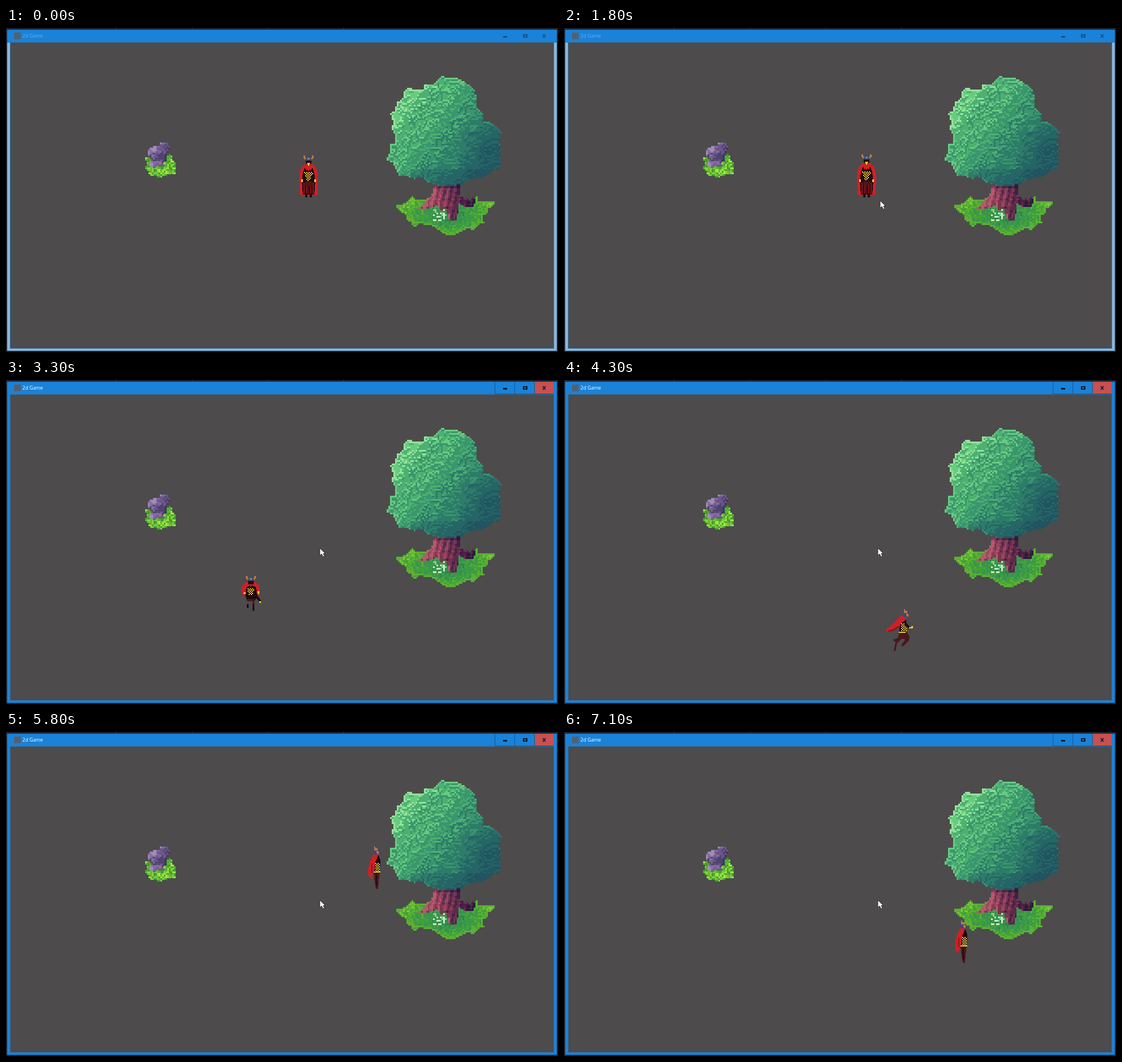
Recreate the animation shown at these times as an HTML page. Size 976 by 574 pixels, loop 7.2 s.

```html
<!DOCTYPE html>
<html lang="en">
<head>
<meta charset="utf-8">
<title>2d Game</title>
<style>
html, body { margin: 0; width: 100%; height: 100%; overflow: hidden; background: #1c2531; }
svg { display: block; width: 976px; height: 574px; }
text { font: 8.6px "Open Sans", "Noto Sans", sans-serif; }
</style>
</head>
<body>
<svg id="stage" viewBox="0 0 976 574" shape-rendering="crispEdges"></svg>
<script>
const LOOP = 7200, STEP = 100, ACTIVE_AT = 2300, CELL = 3;
const stage = document.getElementById('stage');

function add(parent, tag, attrs) {
  const el = document.createElementNS('http://www.w3.org/2000/svg', tag);
  for (const k in attrs) el.setAttribute(k, attrs[k]);
  return parent.appendChild(el);
}
const group = () => add(stage, 'g', {});
const rect = (x, y, width, height, fill, parent = stage) => add(parent, 'rect', { x, y, width, height, fill });
const path = (parent, fill, d) => add(parent, 'path', { fill, d });
const clamp = (v, a, b) => Math.max(a, Math.min(b, v));

let seed = 11;
function rnd() {
  seed = (seed * 1664525 + 1013904223) >>> 0;
  return seed / 4294967296;
}

/* Window */
rect(0, 0, 976, 574, '#1c2531');
for (const x of [194, 329, 462, 596]) rect(x, 0, 1, 2, '#4b5663');
const frame = rect(2, 3, 972, 569, '#8bb4da');
rect(2, 3, 972, 23, '#1a82d9');
rect(7, 25, 962, 543, '#326b98');
rect(8, 26, 960, 541, '#4d4b4c');
rect(14, 8, 12, 12, '#53616e');
const title = add(stage, 'text', { x: 29, y: 17 });
title.textContent = '2d Game';
const buttons = group();
rect(934, 3, 34, 22, '#c75050', buttons);
for (const x of [864, 899, 934]) rect(x, 3, 1, 22, '#17558c', buttons);
rect(864, 24, 104, 1, '#17558c', buttons);
const glyphs = group();
path(glyphs, 'inherit', 'M879 14h7v3h-7zM914 11h8v6h-8zM916 13v2h4v-2z').setAttribute('fill-rule', 'evenodd');
add(glyphs, 'path', { d: 'M949 11l5 6M954 11l-5 6', 'stroke-width': 1.5, 'shape-rendering': 'auto' });

/* Pixel scenery */
const parse = s => s.split(' ').map(p => p.split(',').map(Number));

function inside(pts, x, y) {
  let hit = false;
  for (let i = 0, j = pts.length - 1; i < pts.length; j = i++) {
    const [ax, ay] = pts[i], [bx, by] = pts[j];
    if ((ay > y) !== (by > y) && x < (bx - ax) * (y - ay) / (by - ay) + ax) hit = !hit;
  }
  return hit;
}

function raster(outline, colour) {
  const pts = parse(outline), xs = pts.map(p => p[0]), ys = pts.map(p => p[1]);
  const x0 = Math.min(...xs), y0 = Math.min(...ys), layers = {};
  const isIn = (x, y) => inside(pts, x + 1.5, y + 1.5);
  for (let y = y0; y < Math.max(...ys); y += CELL)
    for (let x = x0; x < Math.max(...xs); x += CELL) {
      if (!isIn(x, y)) continue;
      const edge = !isIn(x - 3, y) || !isIn(x, y - 3) ? -1 : !isIn(x + 3, y) || !isIn(x, y + 3) ? 1 : 0;
      const c = colour(x, y, edge);
      layers[c] = (layers[c] || '') + `M${x} ${y}h3v3h-3z`;
    }
  for (const c in layers) path(stage, c, layers[c]);
}
const pick = (pal, v) => pal[clamp(Math.round(v), 0, pal.length - 1)];

const grass = ['#78c83a', '#5cb032', '#43a13c', '#35954f', '#2d8551'];
raster('687,312 696,314 708,308 720,298 726,304 740,304 760,298 810,302 826,308 830,299 836,300 834,308 849,306 866,309 860,317 850,319 853,327 842,334 846,348 838,345 828,357 815,356 802,362 786,369 770,362 757,352 745,348 730,347 722,354 716,344 706,340 710,333 696,324',
  (x, y, edge) => {
    const r = Math.hypot((x - 778) / 88, (y - 330) / 40);
    return pick(grass, edge ? 1 : 3.9 - r * 3.2 + (rnd() - .5) * 2);
  });

const bark = ['#b65a6b', '#984660', '#793650', '#5e294b', '#432044', '#2d1a38'];
raster('757,272 804,272 803,294 811,302 821,304 826,299 831,305 826,316 812,317 801,312 799,326 797,341 784,341 781,330 777,318 770,324 764,315 752,316 742,322 728,319 738,312 748,303 754,292',
  (x, y, edge) => pick(bark, (x - 740) / 18 + Math.sin(x * .55 + y * .12) * .9 + (y < 283 ? 1.3 : 0) + edge * .8 + (rnd() - .5)));

for (let i = 0; i < 22; i++)
  rect(755 + CELL * Math.floor(rnd() * 8), 321 + CELL * Math.floor(rnd() * 7), 3, 3, i % 3 ? '#cbefc4' : '#8bcf8d');

const leaf = ['#c4f7bb', '#94e49b', '#68cb80', '#4db072', '#3a966c', '#2d7b69', '#256566', '#205561'];
const baseShade = (x, y) => {
  const u = (x - 673) / 203, v = (y - 85) / 193;
  const lobe = Math.max(0, 1 - Math.hypot((u - .86) / .3, (v - .66) / .35));
  return 7 * (.17 + .46 * u + .33 * v) + lobe * 1.1 + (v > .85 && u > .2 ? .9 : 0);
};
const leafShade = {};
const key = (x, y) => Math.round((x - 673) / CELL) + ',' + Math.round((y - 85) / CELL);
for (let n = 0; n < 680; n++) {
  const x = 673 + rnd() * 203, y = 85 + rnd() * 193, len = 2 + rnd() * 4;
  const a = -.75 + (rnd() - .5) * 1.9 + (x - 770) / 170;
  const power = clamp(1.9 - baseShade(x, y) * .25, .45, 1.6);
  for (let k = 0; k < len; k++) {
    const px = x + Math.cos(a) * k * CELL, py = y + Math.sin(a) * k * CELL;
    leafShade[key(px, py + CELL)] = power * .65;
    leafShade[key(px, py)] = -power * (k < 1 ? .7 : 1.05);
  }
}
raster('673,233 678,222 678,207 688,205 689,192 683,181 684,163 679,152 689,145 690,133 703,124 702,113 712,106 725,110 738,108 740,100 755,100 765,90 770,85 780,88 798,88 812,97 826,106 833,124 832,140 843,150 845,165 858,168 868,176 876,186 872,203 876,214 874,237 873,248 862,252 852,260 838,266 822,267 808,276 795,279 765,279 745,273 735,264 722,267 706,262 696,262 690,250 685,240',
  (x, y, edge) => pick(leaf, baseShade(x, y) + (edge < 0 ? -1 : (leafShade[key(x, y)] || 0) + edge * .2)));

const lime = ['#a5e83f', '#82d338', '#63b832', '#469d32'];
raster('246,230 254,230 260,238 280,237 282,226 292,223 294,235 302,238 299,247 299,259 287,259 272,266 264,262 254,260 252,253 246,248 249,240',
  () => pick(lime, rnd() * 3.4));
const stone = ['#a08bb8', '#846e9f', '#6c5789', '#514371', '#3c345b'];
raster('251,218 255,211 264,210 272,207 274,203 287,203 290,217 284,222 285,235 278,238 280,245 271,244 264,249 254,245 255,236 261,232 252,226',
  (x, y, edge) => pick(stone, (x - 252) / 18 + (y > 220 && y < 236 ? 1 : 0) + edge * .7 + rnd() * 1.6 - .2));

/* Hero: shapes are relative to the point between the feet */
const RED = '#cf2026', DEEP = '#8d151c', DARK = '#210b10', MAROON = '#4b171b',
  GOLD = '#eccb35', HORN = '#c27a43', HELM = '#3b4a70', SKIN = '#c07845';
const hero = group();

function checks(x0, y0, cols, rows, taper) {
  let d = '';
  for (let r = 0; r < rows; r++)
    for (let c = 0; c < cols; c++) {
      const off = Math.abs(c - (cols - 1) / 2);
      if ((r + c) % 2 === 0 && off <= cols / 2 - r * taper) d += `M${x0 + c * 2} ${y0 + r * 2}h2v2h-2z`;
    }
  return d;
}
const frontHead = y => [
  [HORN, `M-9 ${y}h3v4h3v3h-4v-2h-2zM9 ${y}h-3v4h-3v3h4v-2h2z`],
  [HELM, `M-5 ${y + 5}l3-2h4l3 2v9h-10z`],
  ['#6c88b2', `M-2 ${y + 4}h4v3h-4z`],
  [DARK, `M-5 ${y + 9}h10v6h-10z`]
];
const sideHead = (x, y) => [
  [HELM, `M${x} ${y + 4}h8v3h2v7h-9z`],
  [HORN, `M${x + 2} ${y}h2v3h4v4h-3v-2h-3z`],
  ['#6c88b2', `M${x + 2} ${y + 5}h3v2h-3z`],
  [SKIN, `M${x + 6} ${y + 8}h4v5h-3z`]
];

function idleFront(up) {
  const w = 16 + up / 2, y = -73 - up, s = -59 - up;
  return [
    [RED, `M-5 ${s}h10l8 7L${w} -42 16-4 10-2H-10L-16-4-${w}-42-13 ${s + 7}z`],
    [DARK, `M-7 ${s + 8}L0 ${s + 12} 7 ${s + 8} 10-43 12-28 10-4H-10L-12-28-10-43z`],
    [DEEP, 'M-9-25h2v20h-2zM7-25h2v20h-2zM-4-24h2v18h-2zM3-24h2v18h-2z'],
    [MAROON, 'M-6-27h12v8h-12zM-1-22h2v17h-2z'],
    [GOLD, checks(-8, -44 - up / 2, 8, 8, .38) + 'M-13-31h3v5h-3zM10-31h3v5h-3z'],
    [DARK, 'M-6-6h4v7h-4zM2-6h4v7h-4z'],
    ...frontHead(y),
    [GOLD, `M-3 ${y + 13}h6l-3 6z`],
    [RED, `M-1 ${y + 21}h2v6h-2zM-5 ${y + 22}h2v4h-2zM3 ${y + 22}h2v4h-2z`]
  ];
}

function runFront(step) {
  const a = step % 2 ? -5 : 0, b = -5 - a;
  return [
    [RED, 'M-8-51H8L15-44 16-34 12-23H-6L-16-30-17-43z'],
    [DARK, 'M-8-42L0-46 9-42 11-27 7-18H-7L-10-28zM10-30l8 12-2 3-8-9z'],
    [GOLD, checks(-6, -40, 6, 6, .2) + 'M-13-33h4v3h-4zM15-17h3v3h-3zM12-35h3v5h-3z'],
    [MAROON, `M-7-21H6v${9 + b}h-3v-5h-7v${5 + a}h-3z`],
    [DARK, `M-7-12h3v${12 + a}h-3zM3-12h3v${12 + b}h-3z`],
    ...frontHead(-62),
    [RED, 'M-1-47h2v4h-2z']
  ];
}

const runBack = step => [
  [DARK, step % 2 ? 'M-6-14h4v14h-4zM2-14h4v9h-4z' : 'M-6-14h4v9h-4zM2-14h4v14h-4z'],
  [RED, 'M-6-60H6L14-52 16-30 13-9 5-6-4-10-14-7-16-30-14-52z'],
  [DEEP, 'M-7-46h2v34h-2zM0-48h2v36h-2zM7-44h2v34h-2z'],
  ...frontHead(-73)
];

const legs = [
  'M-6-33H8L12-25 11-19 1-8-3-10 4-20-2-22-10-14-13 0H-16L-13-15-18-20-9-23z',
  'M-5-33H7L6-23 12-13 10-1 6 0 7-12-1-22-6-15-16-11-18-15-9-20z',
  'M-5-33H7L8-20 3-10 5 0H-1L-2-11 2-20-4-20-11-9-15-12-8-22z'
];
const runSide = step => [
  [DARK, 'M-5-58H5L7-47 6-31H-6z'],
  [MAROON, legs[step % 3]],
  [RED, 'M-2-63L7-59 3-53-3-49-7-41-17-36-27-34-31-37-19-46-11-55z'],
  [DEEP, 'M-26-36l9-3 9-5 2 2-10 6-10 2z'],
  [GOLD, checks(-3, -49, 5, 7, 0) + 'M-7-34h12v2h-12zM11-42h4v-2h3v4h-7z'],
  [DARK, 'M5-50l7 7-1 3-8-6z'],
  ...sideHead(0, -74)
];

const idleSide = up => [
  [MAROON, 'M-5-30H6L4-14 3 0H-1L-3-12z'],
  [DARK, 'M-5-59H4L7-51 6-30H-5zM-1-27h2v22h-2z'],
  [RED, `M-6 ${-61 - up}H3L1-54-2-48-3-35-6-28-8-18-14-22-15-34-11-50z`],
  [DEEP, 'M-9-45h2v17h-2z'],
  [GOLD, checks(-2, -46, 4, 8, 0) + 'M-5-31H7v2h-12z'],
  ...sideHead(-6, -75 - up)
];

const poses = { idleFront, runFront, runBack, runSide, idleSide };
const route = [
  [0, 535, 299, 'idleFront'],
  [2400, 535, 299, 'runSide', -1],
  [2835, 433, 299, 'runFront'],
  [3600, 433, 480, 'runSide'],
  [4500, 646, 480, 'runBack'],
  [5360, 646, 278, 'runSide'],
  [5400, 655, 278, 'idleSide'],
  [6150, 655, 278, 'runFront'],
  [6700, 655, 409, 'runSide'],
  [6930, 706, 409, 'idleSide'],
  [LOOP, 706, 409, 'idleSide']
];
const pointer = [[500, 652, 574], [900, 620, 413], [1700, 559, 306], [2200, 559, 306], [2300, 555, 298], [LOOP, 555, 298]];

function along(keys, t) {
  const i = clamp(keys.findIndex(k => k[0] > t) - 1, 0, keys.length - 2);
  const a = keys[i], b = keys[i + 1], p = clamp((t - a[0]) / (b[0] - a[0]), 0, 1);
  return { x: Math.round(a[1] + (b[1] - a[1]) * p), y: Math.round(a[2] + (b[2] - a[2]) * p), pose: a[3], flip: a[4] || 1 };
}

const cursor = add(stage, 'path', {
  d: 'M0 0V13L3 10 5.5 15 8 14 5.8 9.5H9.5z', fill: '#fff', stroke: '#222', 'stroke-width': .8, 'shape-rendering': 'auto'
});

let shown = -1;
function draw(t) {
  if (t === shown) return;
  shown = t;
  const active = t >= ACTIVE_AT, h = along(route, t), c = along(pointer, t);
  frame.setAttribute('fill', active ? '#1a82d9' : '#8bb4da');
  title.setAttribute('fill', active ? '#fff' : '#68b0e8');
  buttons.style.display = active ? '' : 'none';
  const ink = active ? '#10151c' : '#174f84';
  glyphs.setAttribute('fill', ink);
  glyphs.setAttribute('stroke', 'none');
  glyphs.lastChild.setAttribute('stroke', ink);

  const idle = h.pose.startsWith('idle');
  const up = t % 1200 >= 400 && t % 1200 < 800 ? 2 : 0;
  hero.replaceChildren();
  for (const [fill, d] of poses[h.pose](idle ? (h.pose === 'idleSide' ? 0 : up) : Math.floor(t / STEP) + 2)) path(hero, fill, d);
  hero.setAttribute('transform', `translate(${h.x} ${h.y}) scale(${h.flip} 1)`);

  cursor.style.display = t < 500 ? 'none' : '';
  cursor.setAttribute('transform', `translate(${c.x} ${c.y})`);
}

const start = performance.now();
function tick() {
  const t = (performance.now() - start) % LOOP;
  draw(Math.floor(t / STEP) * STEP);
  requestAnimationFrame(tick);
}
draw(0);
requestAnimationFrame(tick);
</script>
</body>
</html>
```
